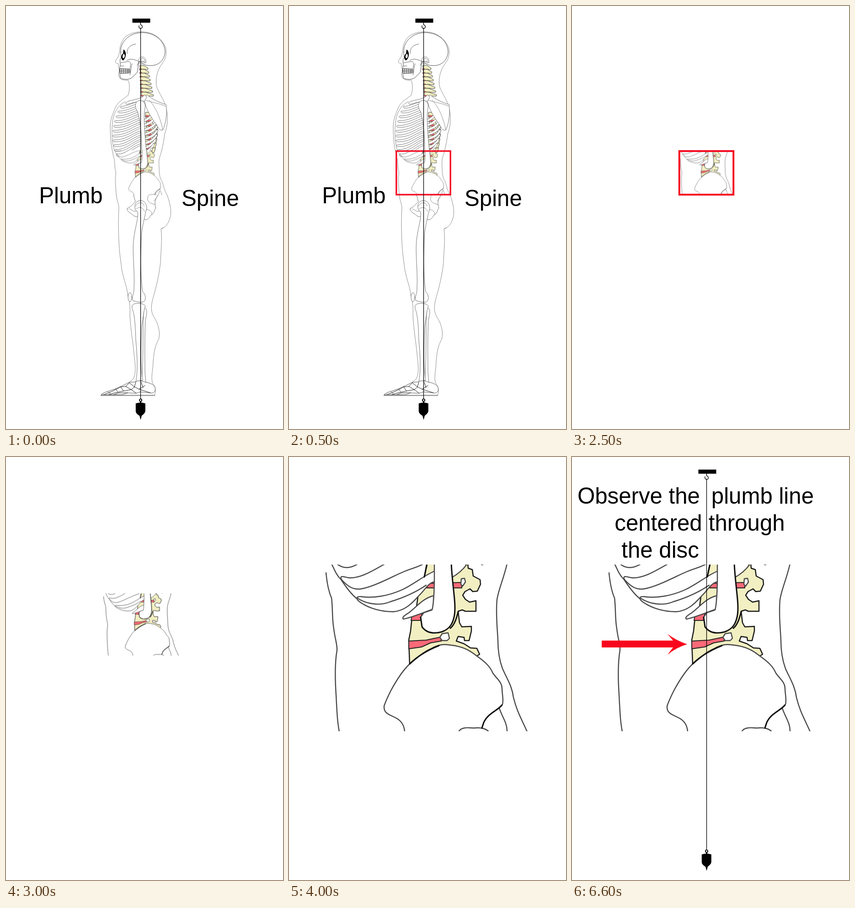
Animation, 606 px wide and 924 px high, one loop 8000 ms. Source, as an HTML page:

```html
<!DOCTYPE html>
<html lang="en">
<head>
<meta charset="utf-8">
<title>Plumb spine</title>
<style>
html, body { margin: 0; width: 100%; height: 100%; overflow: hidden; background: #fff; }
svg { display: block; width: 100vw; height: 100vh; }
text { font: 49.2px "Liberation Sans", Arial, sans-serif; }
path, ellipse, circle { stroke-linejoin: round; stroke-linecap: round; }

.body, .plumb, .note, .box, .torso { animation: 8s step-end infinite; }
.body { animation-name: body; }
.plumb { animation-name: plumb; }
.note { animation-name: note; }
.box { animation-name: box; }
.torso { animation-name: zoom; }

@keyframes body { 0% { visibility: visible } 31.25%, 100% { visibility: hidden } }
@keyframes plumb { 0%, 56.25%, 100% { visibility: visible } 31.25% { visibility: hidden } }
@keyframes note { 0% { visibility: hidden } 56.25%, 100% { visibility: visible } }
@keyframes box {
  0%, 37.5%, 100% { visibility: hidden; stroke-width: 3.3px }
  6.25% { visibility: visible; stroke-width: 3.3px }
  31.25% { visibility: visible; stroke-width: 4px }
}
@keyframes zoom {
  0% { transform: translate(211.9px, 251.8px) scale(.27) }
  37.5% { transform: translate(183.1px, 210.2px) scale(.3735) }
  43.75% { transform: translate(113.5px, 122.5px) scale(.619) }
  50%, 100% { transform: none }
}

.skin { fill: none; stroke: #808080; stroke-width: .9; }
.bone { fill: #fff; stroke: #555; stroke-width: .8; }
.dark { fill: none; stroke: #222; stroke-width: 1; }
.vert { fill: #f2efc2; stroke: #1c1c1c; stroke-width: .8; }
.disc { fill: #fa6977; stroke: #3a1015; stroke-width: .5; }
.torso .skin, .torso .bone { stroke: #484848; stroke-width: 2.4; }
.torso .vert { stroke-width: 2.5; }
.torso .disc { stroke: #222; stroke-width: 2; }
.torso .heavy { fill: none; stroke: #111; stroke-width: 3; }
</style>
</head>
<body>
<svg viewBox="0 0 606 924" preserveAspectRatio="none">
  <clipPath id="window"><rect x="80" y="235" width="442" height="364"/></clipPath>

  <g class="body">
    <!-- skin -->
    <path class="skin" d="M233.5 320C229 300 228 282 228 262C229 245 234 235 240 220C246 208 262 200 267 195C271 185 271 168 267 162C252 163 247 158 246 150L248 138C245 134 246 130 246 126C241 126 238 123 240 119C244 114 247 108 248 102C249 90 251 80 258 71C268 58 290 55 305 57C328 59 346 78 350 94C352 110 347 119 340 128C330 142 326 163 330 178C338 196 346 205 350 222C355 240 354 262 347 280C346 292 343 305 340.6 315.5"/>
    <path class="skin" d="M241.6 413C242 425 247 432 247 442C245 470 246 520 250 550L252 565C254 590 265 612 266 630C271 645 272 660 271 675C273 710 278 735 280 760C284 790 284 805 278 815C268 825 252 832 240 836C225 842 210 845 208 850H325C328 843 328 833 321 824C316 812 322 795 322 775C324 755 326 742 334 728C338 715 334 695 324 680C318 670 316 660 321 640C327 620 335 590 338 560C339 530 342 510 339 487C346 485 356 478 360 458C362 445 358 428 352.6 413"/>
    <path class="skin" d="M340 486L344 484"/>

    <!-- skull -->
    <path class="bone" style="stroke:#222" d="M251 101C249 82 266 59 297 58C329 58 348 79 348 101C346 121 331 132 312 130C302 130 298 124 291 121C289 132 288 141 287 145L276 156C271 161 257 162 250 157L249 149V132C252 127 248 122 250 116C254 111 250 107 251 101Z"/>
    <path class="skin" style="stroke:#555" d="M284 83C271 85 264 92 265 104M264 119C272 114 279 116 291 121L307 123M251 124L268 121C274 122 273 130 271 137M276 126C272 136 274 145 271 151M291 121L287 130M250 131H258"/>
    <circle class="skin" cx="298" cy="119" r="8"/>
    <circle class="skin" cx="299" cy="118" r="4"/>
    <path d="M257 95C264 98 264 113 256 119C250 116 252 106 256 104Z"/>
    <path fill="#fff" d="M258 104C262 108 259 115 256 114C254 111 255 107 258 104"/>
    <path class="dark" stroke-width=".8" d="M249 137L271 138V146L250 147ZM249 142H271M253 137V147M257 137V147M261 137V147M265 138V147M268 138V146"/>

    <g id="neck"></g>
    <g id="chest"></g>

    <!-- shoulder -->
    <path class="bone" d="M300 200L309 194C318 203 336 211 350 215C353 234 350 256 343 271C335 273 333 265 330 260C320 247 308 229 304 212Z"/>
    <path class="skin" d="M303 205C318 211 336 212 349 219M313 205C326 220 336 238 343 270"/>
    <path class="bone" d="M262 212C266 205 282 207 298 199L303 194L308 199L303 208C291 207 279 211 264 215Z"/>
    <path class="bone" d="M288 231C281 221 281 209 292 206C303 206 307 215 303 228C301 251 304 283 307 316H297C297 281 294 253 288 231Z"/>

    <!-- hip and thigh -->
    <path class="bone" d="M279 413L283 427C276 435 270 441 265 442C265 451 274 452 278 457C284 463 295 458 300 464C307 471 313 464 317 457C326 452 324 445 328 441C324 431 326 421 333 413"/>
    <path class="skin" d="M312 413C306 424 312 430 321 432L326 434M270 443L281 449L289 447M305 444C312 444 319 448 319 455M336 404C334 413 329 419 324 426"/>
    <path class="bone" d="M283 445C279 433 285 425 294 425C305 425 311 437 306 449C302 466 299 480 297 493C294 540 294 595 299 624C306 630 307 643 301 646C294 649 286 645 278 644C273 638 281 628 280 617C282 580 276 540 279 512C282 485 290 464 288 450Z"/>
    <path class="skin" d="M284 437C286 427 302 428 302 437M285 443C292 438 300 439 303 449"/>

    <!-- lower leg -->
    <ellipse class="bone" cx="271" cy="636" rx="4" ry="10"/>
    <path class="bone" d="M302 659C311 661 308 671 305 687C303 725 304 770 304 800L306 822H297C300 780 300 720 300 690Z"/>
    <path class="bone" d="M276 654C280 647 300 648 305 655C301 666 300 680 297 700C295 750 294 790 299 817L284 822C289 795 287 762 284 730C283 700 282 675 276 661Z"/>

    <!-- foot -->
    <path class="bone" style="stroke:#333" d="M283 821C290 816 300 820 306 822C316 823 324 828 326 833C328 842 324 847 314 845L294 843L284 846L266 845L255 849H208C215 843 227 841 238 837L260 827L270 822Z"/>
    <path class="dark" stroke-width=".8" d="M284 821L281 832L291 837L304 829M281 832L270 823L262 831L274 838L281 832M274 838L285 846M262 831L251 832L257 841L274 838M251 832L232 842L214 849M257 841L238 845L225 849M266 845L246 845L236 849M240 837L244 842M224 843L229 848M291 837L316 845M296 822L300 834"/>
    <path class="skin" style="stroke:#555" d="M207 851H326"/>

    <text x="72.200" y="431">Plumb</text>
    <text x="384" y="437">Spine</text>
  </g>

  <g class="torso">
    <g clip-path="url(#window)">
      <path class="skin" d="M81 253C83 275 87 294 93 308C96 330 94 355 98 375C100 395 106 410 105 422C100 450 101 490 103 520C105 560 106 580 110 600"/>
      <path class="skin" d="M477 233C470 265 458 290 455 312C452 345 456 375 457 400C457 425 460 443 467 462C476 483 488 500 491 525C498 555 510 575 521 600M459 545C464 565 478 580 477 600"/>

      <!-- spine -->
      <path class="vert" d="M302 230L296 262L304 278L284 290L278 335L270 342L266 380L262 400L264 454L330 425L410 435L417 431L411 418L397 417L383 408L366 402L370 392L383 394L384 401H394L399 380V370L378 371L373 362L370 337L379 334L386 337H409V314L395 317L386 311L380 302L385 294L396 288L402 294L412 293L419 278L418 268L403 260L401 246L392 243L391 230Z"/>
      <path class="disc" d="M306 276L378 274V286L301 286ZM270 341L291 340L288 357L267 357ZM262 402L300 400L333 393V402L310 406L290 415L262 419Z"/>
      <path class="bone" d="M377 266L384 265L386 273L380 282L376 278ZM335 386L348 384L351 396L346 401H335L330 394Z"/>
      <path class="bone" d="M355 230H392C384 243 371 255 355 264Z"/>

      <!-- ribs -->
      <path class="bone" d="M107 235C118 243 133 244 150 234"/>
      <path class="skin" d="M94 235C100 248 104 258 114 268C124 283 135 299 148 309"/>
      <path class="bone" d="M209 234C185 247 158 265 132 264C119 262 110 257 115 268C127 281 139 291 158 288C188 283 232 258 250 251C268 243 279 242 293 234"/>
      <path class="bone" d="M319 249C293 260 271 280 245 291C218 303 185 309 158 305C145 304 146 311 157 318C176 331 202 338 228 338C256 336 272 316 286 301C298 290 303 276 319 272Z"/>
      <path class="skin" d="M149 308C172 323 201 325 222 316C255 306 281 293 300 280"/>
      <path class="bone" d="M316 303C292 309 277 330 261 341C251 347 247 351 250 354C267 351 288 342 316 332Z"/>

      <!-- arm -->
      <path fill="#fff" d="M318 230L318 275L313 333L295 340L288 350L291 372C302 386 319 386 334 382C352 376 359 363 362 345C366 320 357 280 355 230Z"/>
      <path class="skin" d="M318 232L318 275C317 300 317 320 313 334L295 340L288 350"/>
      <path class="heavy" d="M288 350L291 371C302 386 319 386 334 382C352 376 359 363 362 345C366 320 357 280 355 232M302 234L296 262M353 374C363 366 367 350 370 338M264 452C280 436 304 422 330 413"/>

      <!-- pelvis -->
      <path class="bone" d="M253 600C252 585 245 575 232 569C218 562 207 560 208 544C212 532 218 520 223 510C235 488 250 465 264 452C280 438 295 425 312 418C330 408 340 409 355 411C380 414 395 422 410 434C430 448 440 458 446 472C455 485 466 492 466 505C466 518 470 530 467 540C455 555 435 560 426 580L422 592"/>
      <path class="skin" d="M371 600C378 588 395 592 405 592C420 590 432 594 437 600"/>
      <path class="heavy" d="M466 542C455 555 435 560 426 580L422 592M264 452C280 438 295 425 328 412"/>
      <path class="skin" d="M386 235H390M421 235H424"/>
    </g>
  </g>

  <rect class="box" x="234.8" y="316.9" width="118.4" height="95.2" fill="none" stroke="#f5091f"/>

  <g class="plumb">
    <path d="M276.500 27.500H315.500V36.500H276.500ZM283.800 868L291 866.500H298L304.800 868V885C304 890 299 893 297 895L294.500 904L292 895C289 893 284 890 283.800 885Z"/>
    <path fill="none" stroke="#000" stroke-width="1.300" d="M294.500 36V40M291 43C289 51 300 51 298 44C297 41 294 42 294 39M294.500 48V858"/>
    <circle cx="294.500" cy="861" r="2.600" fill="#fff" stroke="#000" stroke-width="1.800"/>
    <path stroke="#000" stroke-width="3" d="M294.500 865V868"/>
  </g>

  <g class="note">
    <text x="12" y="102">Observe the</text>
    <text x="304.800" y="102">plumb line</text>
    <text x="93.300" y="161">centered</text>
    <text x="298.800" y="161">through</text>
    <text x="108.300" y="220">the disc</text>
    <path fill="#f8061d" d="M65 401H221Q216 395 209 386.500Q228 401 252 409Q228 416 209 432Q216 422 221 416H65Z"/>
  </g>
</svg>
<script>
const add = (id, cls, d) => {
  const path = document.createElementNS("http://www.w3.org/2000/svg", "path");
  path.setAttribute("class", cls);
  path.setAttribute("d", d);
  document.getElementById(id).append(path);
};

// Neck vertebrae with spines sloping down and back
for (let i = 0; i < 8; i++) {
  const x = 293 + i * .5, y = 130 + i * 8.3, reach = 9 + i * 1.2;
  add("neck", "vert", `M${x} ${y}l9 0 ${reach} 6-1 3-${reach - 1}-1-8 1Z`);
  add("neck", "disc", `M${x - 1} ${y + 7}h5v2h-5Z`);
}

// Back vertebrae, each crossed by a rib
for (let i = 0; i < 9; i++) {
  const y = 232 + i * 10, bow = Math.sin((i + 1) / 10 * Math.PI), x = 304 + bow * 5 - i * .5;
  add("chest", "vert", `M${x} ${y}l14 1 1 9-15 0Z`);
  add("chest", "disc", `M${x} ${y + 7}l11 0 0 3.500-11 0Z`);
  if (i > 2) add("chest", "vert", `M${x + 18} ${y - 1}l7-2 0 4-3 8-4-1Z`);
}
for (let i = 0; i < 9; i++) {
  const y = 242 + i * 10, end = 318 + 12 * Math.sin((i + 1) / 9 * Math.PI);
  add("chest", "bone", `M300 ${y + 7}Q${end - 7} ${y + 1} ${end} ${y - 12}l3 2Q${end - 3} ${y + 6} 300 ${y + 12}Z`);
}

// Front ribs slope down toward the breastbone
for (let i = 0; i < 11; i++) {
  const y = 207 + i * 9.4, left = 232 + 16 * ((i - 6) / 6) ** 2, drop = 13 + i * 1.1;
  add("chest", "bone", `M294 ${y}C278 ${y + 4} 262 ${y + drop} ${left + 4} ${y + drop - 1}q-5 1 0 4C264 ${y + drop + 5} 279 ${y + 8} 294 ${y + 4}`);
}
add("chest", "skin", "M262 209C247 214 238 229 234 247C230 272 232 300 237 315");
</script>
</body>
</html>
```
